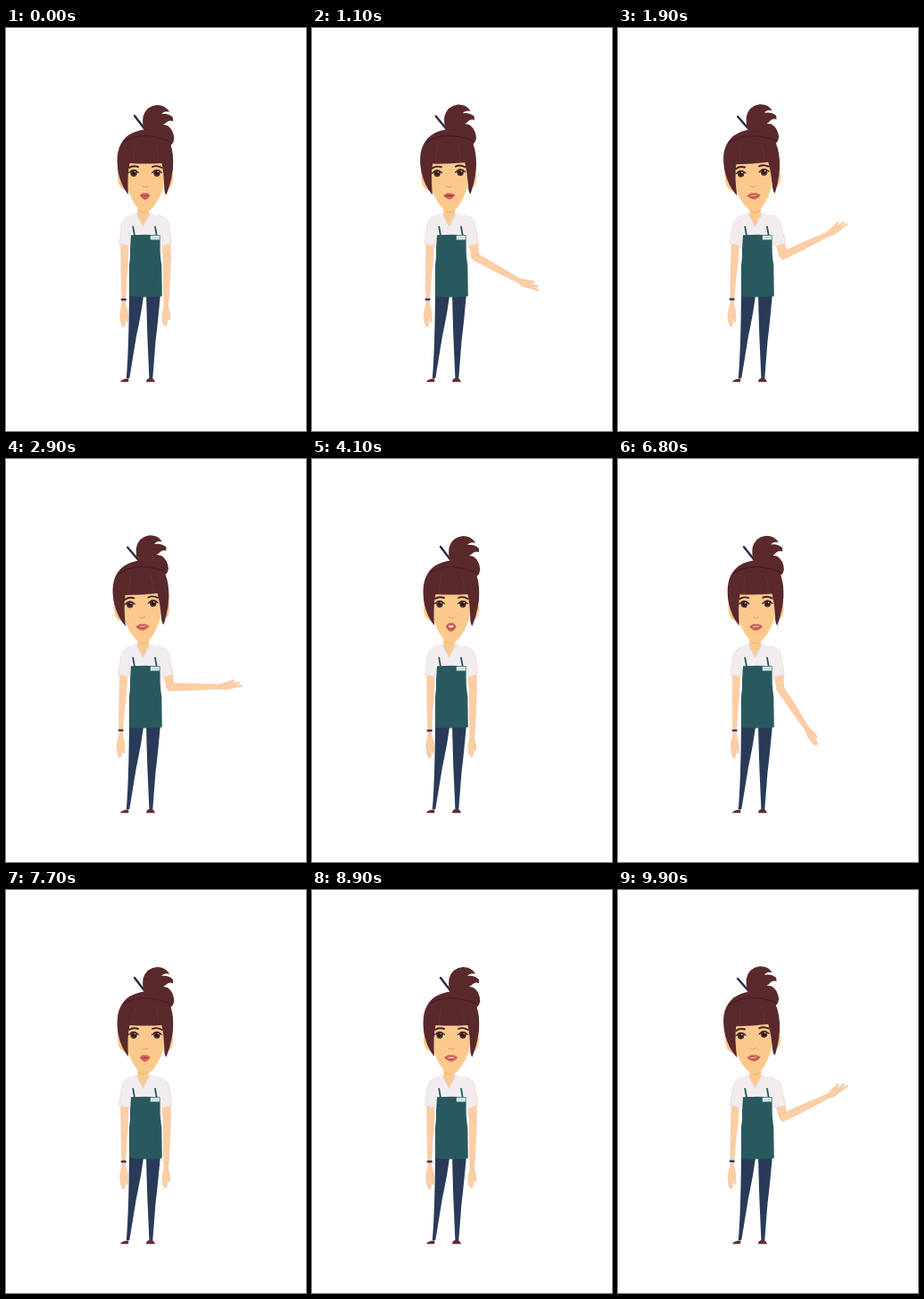
Recreate the animation shown at these times as an HTML page. Size 336x450 px, loop 10 s.

```html
<!DOCTYPE html>
<html lang="en">
<head>
<meta charset="utf-8">
<title>Shop assistant</title>
<style>
  html, body { margin: 0; width: 100%; height: 100%; overflow: hidden; background: #fff; }
  svg { display: block; width: 336px; height: 450px; }
  .skin { fill: #fbcfa2; stroke: #f8bda4; stroke-width: .6; }
  .face { fill: #fcc98d; }
  .shade { fill: #f3bb80; }
  .shirt { fill: #f1edef; }
  .sleeve { stroke: #f6d3cf; stroke-width: .8; }
  .hair { fill: #5a292c; }
  .apron { fill: #29595e; }
  .jeans { fill: #2a3b59; }
  .shoe { fill: #642b33; }
  .line { fill: none; stroke-linecap: round; stroke-linejoin: round; }
</style>
</head>
<body>
<svg viewBox="0 0 336 450">
  <!-- legs -->
  <path class="jeans" d="M138 296 H154.5 Q151 322 146 344 L138.3 391 H134.8 Q137.5 360 138 296Z"/>
  <path class="jeans" d="M157 296 H173 Q170 330 167.5 350 L164.3 391 H160.4 Q158 345 157 296Z"/>
  <path class="shoe" d="M128 395.3 Q129 392.8 134.5 391.5 H137.5 L137 395.3Z M157 395.3 Q157 391.8 160.5 391 H164 Q166.5 393 167 395.3Z"/>

  <!-- resting arm -->
  <g id="restArm">
    <path class="skin" d="M128.8 236 H137 Q137 262 134.8 280 L133.6 308 L136.3 317 L136.8 328 L135.3 329 L134 321 L133 333 L130.8 334 L129 330 L127.5 320 L130 308 Q128.5 270 128.8 236Z"/>
    <path class="line" d="M129.8 303.2 H133.6" stroke="#3b3c66" stroke-width="2.4"/>
    <path class="shirt sleeve" d="M140 209 Q131 212 129.5 220 L126.7 241 L137.8 243 L142 222Z"/>
  </g>

  <!-- gesturing arm -->
  <path id="upperArm" class="skin"/>
  <g id="forearm">
    <path class="skin" d="M0 -4 Q25 -3.8 57 -2.2 V2.2 Q25 4 0 4 A4 4 0 0 1 0 -4Z"/>
    <path id="relaxedHand" class="skin" d="M55 -2.2 L61 -4.2 L68 -4.5 L69 -3 L63.5 -2 L75 -1 L75.5 1 L72 3.8 L62 4.2 L55 2.2Z"/>
    <path id="openHand" class="skin" d="M55 -2.2 L62 -4.5 L71 -7.5 L72 -6.3 L66 -3 L77 -5 L78 -3.7 L69 -1 L80 -1.7 L80.5 -.4 L69 2 L62 3.4 L55 2.2Z"/>
  </g>
  <path id="sleeve" class="shirt sleeve"/>

  <!-- torso -->
  <path class="shirt" d="M146 206 L138 210 Q134 220 137.5 236 L139 262 H173.5 L175.5 236 Q180 222 176 212 L161 206Z"/>
  <path class="face" d="M148 194 H160 V208 L153.5 221 L147 209Z"/>
  <path class="shade" d="M148 199 H160 V204 Q153 210 148 204Z"/>
  <path class="line" d="M147 209 L153.5 221.5 L161 208" stroke="#ddd5db" stroke-width="1"/>
  <path class="line" d="M142.3 222 L144 232 M167 222 L168.8 232" stroke="#29595e" stroke-width="1.8"/>
  <path class="apron" d="M140 231.3 Q156 230 172.5 231.3 L172.6 247 Q172.5 254 174.3 265 L174.8 299.5 Q156 301.5 138 299.5 L138 265 Q139.6 255 139 247Z"/>
  <rect x="161.8" y="231.8" width="10" height="4.6" fill="#d9eff2"/>
  <path class="line" d="M163.3 234 H170.3" stroke="#9cc5cc" stroke-width=".8"/>

  <!-- head -->
  <g id="head">
    <path class="line" d="M144 98 L157 115" stroke="#222b49" stroke-width="2.4"/>
    <path class="hair" d="M156 117 Q152 110 153.5 99 Q157 87 169 86 Q179 86 183 94 Q177 92 174 96 Q182 95 187 100 L187 104 Q182 102 178 107 Q175 108 174 106 Q177 109 181 109 Q188 114 188.3 124 Q187 132 180 132 L158 126Z"/>
    <path class="face" d="M126 158 Q123.5 168 127 176 Q130 181 135 180 V158Z M186 158 Q188.5 168 185.5 176 Q182 181 177 180 V158Z"/>
    <path class="hair" d="M125 156 Q122 130 138 119 Q155 109 174 117 Q189 126 187 156 Q186 164 182 168 H130 Q126 164 125 156Z"/>
    <path class="face" d="M135 145 H177.5 Q179 170 175 182 Q169 197 161.5 203.5 Q156 206.5 150 203.5 Q141 195 137 181 Q134 165 135 145Z"/>
    <path class="hair" d="M125 150 Q136 133 156 132 Q178 132 187 150 Q187.5 166 179.5 186.5 Q177 184 177.3 176 Q177 163 174.5 151 Q156 152 138.5 151 Q135.5 164 137 186 Q128.5 176 125.5 160Z"/>
    <path class="line" d="M132 127 Q152 114 184 127" stroke="#45191f" stroke-width="1.2"/>
    <path class="line" d="M145 131 Q142 142 143 150 M168 131 Q171 140 170 150" stroke="#6d383a" stroke-width=".7"/>
    <path class="line" d="M138 156 Q142 153 148 155 M164 155 Q169 152.8 174.5 156" stroke="#462128" stroke-width="1.9"/>
    <g id="eyes"></g>
    <path class="line" d="M153 176.5 Q156 179 159 176.5" stroke="#e3a56d" stroke-width="1.1"/>
    <g id="mouth" transform="translate(155.7 187.6)">
      <path id="lips" fill="#d65f58"/>
      <path id="gap" fill="#8a3636"/>
      <path id="teeth" fill="#fff5ee"/>
    </g>
  </g>
</svg>
<script>
const $ = id => document.getElementById(id);
const LOOP = 10000, STEP = 100, MOVE = 440;

// [start, arm position the move ends in]
const moves = [[960, 1], [2850, 0], [4420, 1], [6600, 0], [8900, 1]];

// One mouth shape per step: round, tall, wide, small
const speech = "otwsowtswwoswwtosotw";
const mouths = {
  o: { w: 6, h: 3.7, open: 0.4 },
  t: { w: 6, h: 4.8, open: 2.3 },
  w: { w: 7.6, h: 3.5, open: 1.3 },
  s: { w: 6.8, h: 3.3, open: 0.8 }
};

$("eyes").innerHTML = [143, 169].map(x => `
  <ellipse cx="${x}" cy="162.4" rx="5.3" ry="3.6" fill="#fff3e6"/>
  <circle cx="${x}" cy="162" r="3.9" fill="#63301f"/>
  <circle cx="${x}" cy="162" r="2.1" fill="#2b1718"/>
  <circle cx="${x + 1.2}" cy="160.6" r=".7" fill="#fff"/>
  <path class="line" d="M${x - 5.4} 161.6 Q${x} 155.6 ${x + 5.4} 161.6" stroke="#3d2023" stroke-width="1.4"/>`).join("");

const mix = (a, b, p) => a + (b - a) * p;

function liftAt(t) {
  let lift = 0;
  for (const [start, end] of moves) {
    const x = Math.min(Math.max((t - start) / MOVE, 0), 1);
    lift = mix(lift, end, 1 - (1 - x) ** 2);
  }
  return lift;
}

function drawMouth({ w, h, open }) {
  $("lips").setAttribute("d", `M${-w} -.5 Q${-w / 2} ${-h} -1.5 ${-h} Q0 ${1 - h} 1.5 ${-h} Q${w / 2} ${-h} ${w} -.5 Q${w * 0.55} ${h} 0 ${h + 0.6} Q${-w * 0.55} ${h} ${-w} -.5Z`);
  const inner = w - 1.3;
  $("gap").setAttribute("d", `M${-inner} -.6 Q0 ${-open - 0.5} ${inner} -.6 Q0 ${open * 2} ${-inner} -.6Z`);
  $("teeth").setAttribute("d", open < 1 ? "" : `M${1 - inner} -.7 Q0 ${-open} ${inner - 1} -.7 Q0 ${open} ${1 - inner} -.7Z`);
}

function drawArm(p) {
  const ex = mix(180.3, 185, p), ey = mix(257, 254, p);
  const cuff = mix(0, 1.8, p);
  $("upperArm").setAttribute("d", `M174 232 H${184 + cuff} L${ex + 4} ${ey} L${ex - 4} ${ey + 1}Z`);
  $("sleeve").setAttribute("d", `M170 209 Q181 211 182.5 219 L${185.7 + cuff} 240.5 L${174.5 + cuff} 243.5 L171 225Z`);
  $("forearm").setAttribute("transform", `translate(${ex} ${ey}) rotate(${mix(91, -25.5, p)})`);
  $("openHand").style.display = p > 0.5 ? "" : "none";
  $("relaxedHand").style.display = p > 0.5 ? "none" : "";
}

function draw(time) {
  const step = Math.floor((time % LOOP) / STEP);
  const lift = liftAt(step * STEP);
  $("head").setAttribute("transform", `translate(${-lift} 0) rotate(${-4 * lift} 153 225)`);
  $("restArm").setAttribute("transform", `rotate(${2.3 * lift} 138 205)`);
  drawArm(lift);
  drawMouth(mouths[speech[step % speech.length]]);
}

const begin = performance.now();
function tick() {
  draw(performance.now() - begin);
  requestAnimationFrame(tick);
}
draw(0);
requestAnimationFrame(tick);
</script>
</body>
</html>
```
